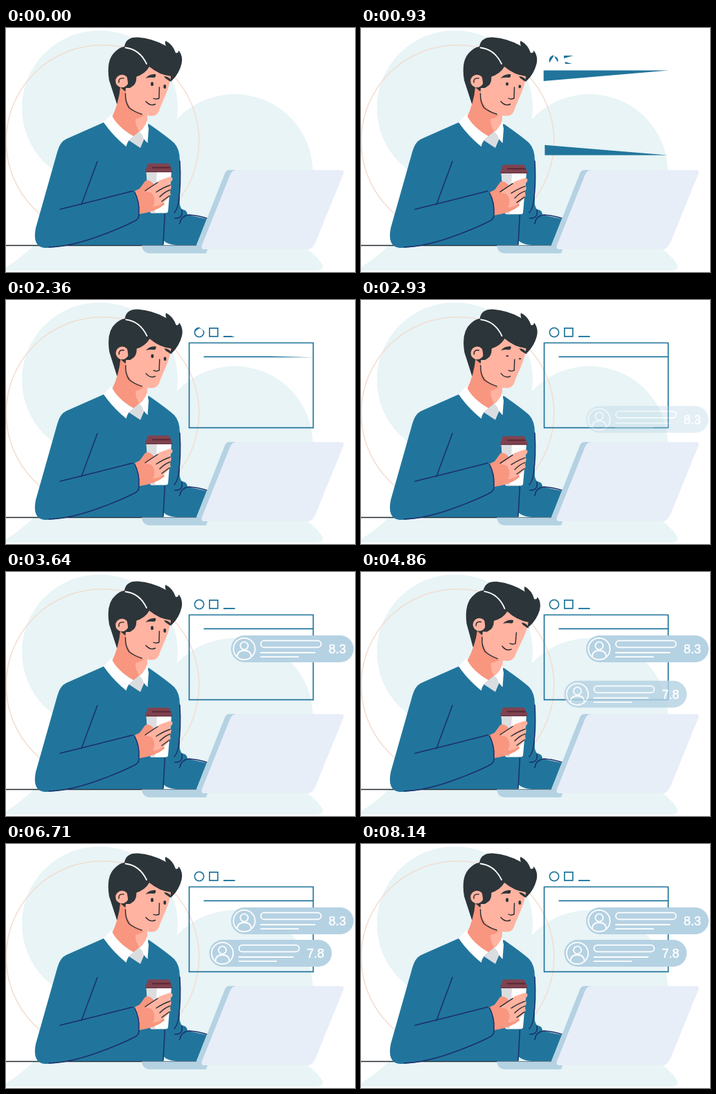
These frames come from a looping animation (504x354 px, 8.21 s). An HTML page:

```html
<!DOCTYPE html>
<html lang="en">
<head>
<meta charset="utf-8">
<title>Coffee and ratings</title>
<style>
  html, body { margin: 0; width: 100%; height: 100%; overflow: hidden; background: #fff; }
  svg { display: block; width: 100vw; height: 100vh; }
  .pale { fill: #e8f4f6; }
  .blue { fill: #21759c; fill-rule: evenodd; }
  .ice { fill: #b5d2e3; }
  .skin { fill: #ffb3a0; }
  .shade { fill: #f8967f; }
  .hair { fill: #2c3539; }
  .white { fill: #fff; }
  .fold { fill: none; stroke: #1b2f6b; stroke-width: 1.5; stroke-linecap: round; stroke-linejoin: round; }
  .ink { fill: none; stroke: #2c2a33; stroke-width: 1.4; stroke-linecap: round; stroke-linejoin: round; }
  .line { fill: none; stroke: #fff; stroke-width: 1.8; stroke-linecap: round; }
  text { font: 18px "Liberation Sans", Arial, sans-serif; fill: #fff; stroke: #fff; stroke-width: .5; }
</style>
</head>
<body>
<svg viewBox="0 0 504 354">
  <defs>
    <g id="card">
      <rect class="ice" x="325" y="92" width="177" height="39" rx="19.5"/>
      <g class="line">
        <circle cx="344" cy="111.5" r="15.6"/>
        <circle cx="344" cy="107" r="5.6"/>
        <path d="M334 123Q334 114 344 114T354 123"/>
        <rect x="368" y="99.7" width="87" height="9.6" rx="4.8"/>
        <path d="M368 117H446M368 123.2H422"/>
      </g>
    </g>
  </defs>

  <circle class="pale" cx="135.5" cy="116" r="112.5"/>
  <circle class="pale" cx="330" cy="209" r="113"/>
  <circle cx="139.5" cy="164" r="139.3" fill="none" stroke="#f2ddd0" stroke-width="1.5"/>
  <path class="pale" d="M40 316Q20 335 0 347V352H448Q461 351 456 342Q447 329 433 319L425 316Z"/>
  <path d="M0 315.5H276" stroke="#222b33" stroke-width="1.3"/>

  <g id="window" class="blue"></g>
  <g id="card1"><use href="#card"/><text x="466" y="117.8">8.3</text></g>
  <g id="card2"><use href="#card" x="-31.5" y="47"/><text x="434.5" y="164.8">7.8</text></g>

  <!-- sweater -->
  <path class="blue" d="M141 137L87 161Q78 165 74 180L43 290C39 310 45 319 58 319Q76 318 92 315H275L290 277L262 271Q262 264 254 263Q250 258 251 250V192Q251 176 243 167Q232 157 206 139L184 165Z"/>
  <path class="pale" d="M227 308Q233 314 246 315H227Z"/>

  <g id="head">
    <path class="hair" d="M160 110L149 76Q144 46 158 34Q164 28 171 27Q173 13 190 13.500Q212 15 231 26Q229 22 230.500 18.500Q241 24 245 36Q249 37 249.500 32.500Q256 41 253.500 52Q250 66 240 76L200 90L166 110Z"/>
    <path class="shade" d="M165 86Q163 108 153 130L163 145L185 158L203 138V118Z"/>
    <path class="skin" d="M187 132Q197 130 204 122V136L194 151Q187 145 187 132Z"/>
    <path class="skin" d="M173 87H179Q185 85 187 71Q201 67 207 56Q221 68 238 70Q238 79 230 98L222 117Q220 127 211 127.500Q180 128 172 98Z"/>
    <circle class="skin" cx="167.5" cy="77" r="9.3"/>
    <path class="hair" d="M174 66L189 62L188 76Q186 86 177 85.500Z"/>
    <path class="ink" d="M172.500 95Q172 108 178 116Q186 122 196 125M163 79Q162 72 170 73"/>
    <path class="ink" d="M221.500 86L221 102Q216 104 213 102M202 106.500Q208 114 215.500 110.500"/>
    <g id="brows" class="hair">
      <path d="M201.500 73Q207 66 216 67Q217 70 214.500 72Q207 71 201.500 73Z"/>
      <path d="M228 70Q236 70 239.500 77.500Q236 78 234 75.500Q230 74 228 70Z"/>
    </g>
    <g class="hair">
      <ellipse class="eye" cx="211" cy="81.2" rx="2" ry="2.9"/>
      <ellipse class="eye" cx="229.3" cy="85" rx="1.9" ry="2.9"/>
    </g>
    <path class="line" d="M172.500 28.500Q193 31 203 52"/>
  </g>

  <!-- collar -->
  <path fill="#d9dde0" d="M176 162L184 157L193 150L200 160L194 174Z"/>
  <path class="white" d="M152 125Q160 143 184 157Q177 160 173.500 172Q155 157 141 137ZM203.500 134L206 146L204.500 167Q199 162 197 156L193 150.500Q202 144 203.500 134Z"/>

  <g class="fold">
    <path d="M132 193.500L109 256M78 263Q131 250 183 236.500"/>
    <path d="M62 318Q92 317 130 303.500Q165 291 187 279.500Q193 276 192 268"/>
    <path d="M251 193Q253 228 249 253Q248 262 243 268M243.500 276Q256 277 254 264M251 284Q252 273 264 271Q278 272 290 276M229.500 268L227 314"/>
  </g>

  <g id="cup">
    <path class="white" d="M202.500 208H239L234 266Q233.500 268.500 230 268.500H211Q208 268.500 207.500 266Z"/>
    <path fill="#dcdde1" d="M202.500 208H218L215 268.500H211Q208 268.500 207.500 266Z"/>
    <path fill="#7f4350" d="M206 196.500H234.500Q236.500 196.500 237 199L238 203H239Q240.500 205 240 209H201.500Q200.500 205 203 203L204 198.500Q204.500 196.500 206 196.500Z"/>
    <path fill="#5d2634" d="M211 201.500H237.500L238 203.500H211ZM201.500 208H240V209.200H201.500Z"/>
    <path class="shade" d="M185 237L193 233L201 222Q205 219 211 224L224 238L229 256Q216 267 192 270Q193 251 185 237Z"/>
    <path class="skin" d="M201 237L222 221L236 216Q242 216 240 221L236 226Q240 228 238 233L237 238Q239 242 235 246L229 252Q221 259 212 259Q218 249 210 239Z"/>
    <path class="ink" d="M201 236L219 224M217 238Q228 231 237 228M222 245Q230 237 237 235M225 251.500L236 243.500"/>
    <path class="fold" d="M185.500 237.500Q193 251 192 269"/>
  </g>

  <!-- laptop -->
  <path class="ice" d="M196 315.500H275L316 211Q318 206 323 206H334L289 327H207Q197 326 196 315.500Z"/>
  <path fill="#e8eef8" d="M333 206H484Q489 206 487.500 211L447 311Q443 321 435 321H286Q281 321 283 315L324 212Q327 206 333 206Z"/>
</svg>
<script>
const LOOP = 8210, CYCLE = 2210;
const $ = id => document.getElementById(id);
const clamp = x => Math.min(1, Math.max(0, x));
const ease = (t, a, b) => { const u = clamp((t - a) / (b - a)); return u * u * (3 - 2 * u); };
const bump = (t, a, b) => Math.sin(Math.PI * clamp((t - a) / (b - a))) ** 2;

// Corner loops run from the first named corner.
const fromTop = (l, t, r, b) => [[r, t], [l, t], [l, b], [r, b]];
const fromBottom = (l, t, r, b) => [[r, b], [l, b], [l, t], [r, t]];
const frame = (l, t, r, b, w) => [fromTop(l, t, r, b), fromBottom(l + w, t + w, r - w, b - w)];
const circle = (x, y, r, dir) => Array.from({ length: 72 }, (_, i) => {
  const a = dir * i / 72 * 2 * Math.PI;
  return [x + r * Math.sin(a), y - r * Math.cos(a)];
});

// Each entry is one path; a frame is an outer and an inner loop.
const shapes = [
  frame(263.7, 61.4, 444.5, 186.2, 1.7),
  frame(293, 40, 306.7, 53.7, 1.7),
  [circle(279, 47, 7.4, -1), circle(279, 47, 5.7, 1)],
  [fromBottom(285.5, 81.5, 444, 83.3)],
  [fromBottom(314, 52, 330.7, 53.9)]
];
const paths = shapes.map(() =>
  $('window').appendChild(document.createElementNS('http://www.w3.org/2000/svg', 'path')));

// Keeps the first part p of a closed outline; the fill closes it with a chord.
function trim(pts, p) {
  const ring = [...pts, pts[0]];
  const len = i => Math.hypot(ring[i + 1][0] - ring[i][0], ring[i + 1][1] - ring[i][1]);
  let left = p * pts.reduce((sum, _, i) => sum + len(i), 0);
  const out = [ring[0]];
  for (let i = 0; i < pts.length && left > 0; i++) {
    const k = Math.min(1, left / len(i)), [x, y] = ring[i], [u, v] = ring[i + 1];
    out.push([x + (u - x) * k, y + (v - y) * k]);
    left -= len(i);
  }
  return 'M' + out.map(q => q[0].toFixed(2) + ' ' + q[1].toFixed(2)).join('L') + 'Z';
}

function rise(id, k) {
  $(id).setAttribute('transform', `translate(0 ${95 * (1 - k)})`);
  $(id).setAttribute('opacity', k);
}

const eyes = [...document.querySelectorAll('.eye')];

function draw(t) {
  const p = clamp((t + 30) / 2990);
  paths.forEach((path, i) => path.setAttribute('d', shapes[i].map(s => trim(s, p)).join('')));
  rise('card1', ease(t, 2560, 3490));
  rise('card2', ease(t, 4470, 5017));

  const c = (t - 75 + CYCLE) % CYCLE;
  const nod = bump(c, 0, 720);
  $('head').setAttribute('transform', `rotate(${2.8 * nod} 183 145)`);
  $('brows').setAttribute('transform', `translate(0 ${nod})`);
  const open = 1 - ease(c, 60, 260) + ease(c, 400, 1000);
  eyes.forEach(e => e.setAttribute('ry', 2.9 * open));
  $('cup').setAttribute('transform', `translate(0 ${1.7 * bump(c, 330, 1510)})`);
}

const start = performance.now();
(function tick() {
  draw((performance.now() - start) % LOOP);
  requestAnimationFrame(tick);
})();
</script>
</body>
</html>
```
